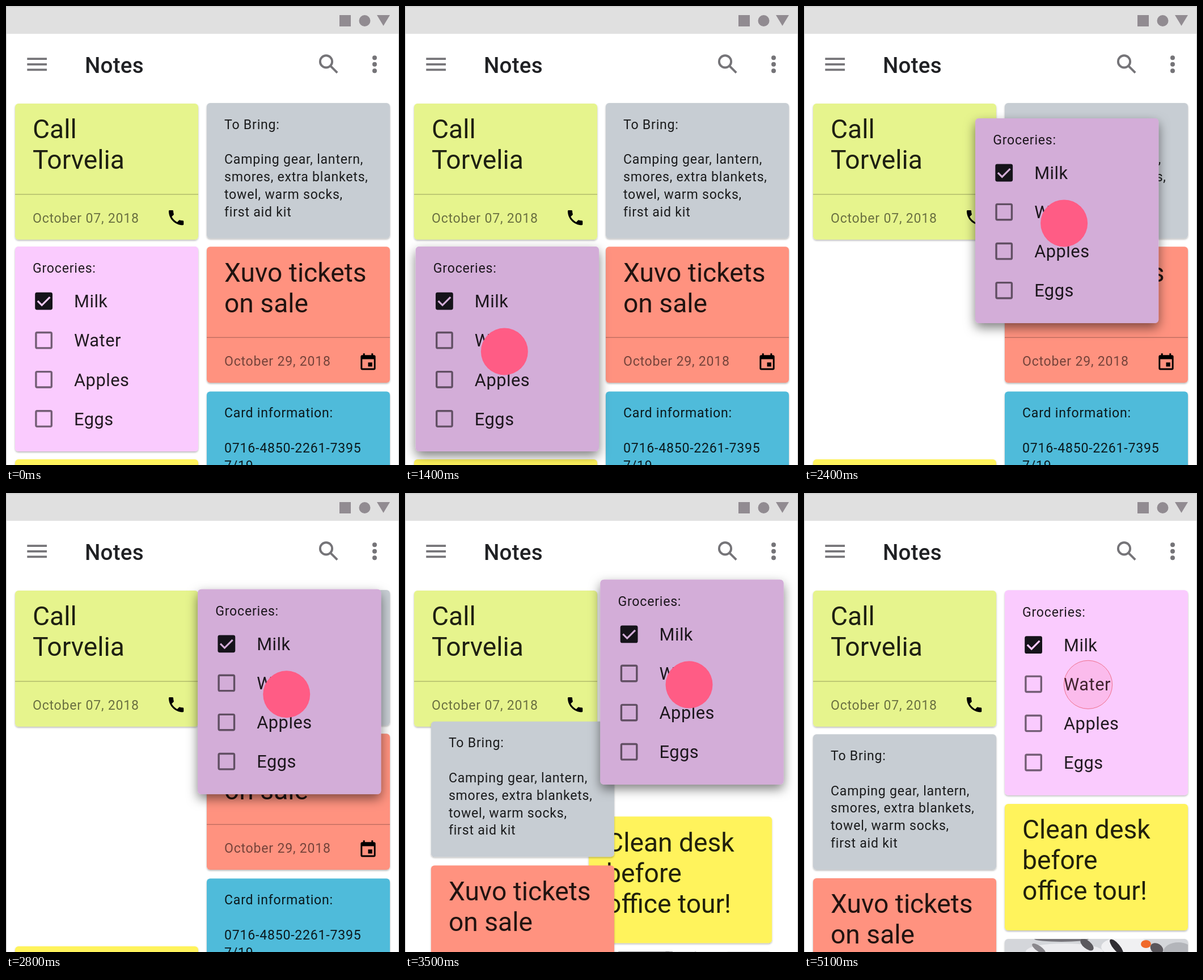
Animation, 693 px wide and 809 px high, one loop 5200 ms. Source, as an HTML page:

```html
<!DOCTYPE html>
<html lang="en">
<head>
<meta charset="utf-8">
<title>Notes</title>
<style>
  html, body { margin: 0; width: 100%; height: 100%; overflow: hidden; background: #fff; }
  svg { display: block; width: 100%; height: 100%; font-family: Roboto, sans-serif; }
  .head { font-size: 46.2px; fill-opacity: .87; }
  .body { font-size: 23.1px; letter-spacing: .77px; fill-opacity: .87; }
  .date { font-size: 23.1px; letter-spacing: .77px; fill-opacity: .54; }
  .item { font-size: 30.8px; letter-spacing: .5px; fill-opacity: .87; }
  .title { font-size: 38.5px; font-weight: 500; letter-spacing: .29px; fill: #202124; }
</style>
</head>
<body>
<svg viewBox="0 0 693 809" preserveAspectRatio="none">
  <defs>
    <filter id="low" x="-10%" y="-10%" width="120%" height="120%">
      <feDropShadow dx="0" dy="1.8" stdDeviation="1.7" flood-opacity=".28"/>
    </filter>
    <filter id="high" x="-20%" y="-20%" width="140%" height="140%">
      <feDropShadow dx="0" dy="8" stdDeviation="9.5" flood-opacity=".5"/>
    </filter>
    <clipPath id="round"><rect width="323" height="240" rx="6"/></clipPath>
  </defs>
  <rect width="693" height="809" fill="#fff"/>
  <g id="cards"></g>
  <circle id="touch" fill="#ff5c85" stroke="#e8404f"/>
  <g id="bar">
    <rect width="693" height="49" fill="#e0e0e0"/>
    <rect width="693" height="2" fill="#d2d2d2"/>
    <g fill="#918b91">
      <rect x="588" y="16" width="20" height="20"/>
      <circle cx="632.5" cy="26" r="10"/>
      <path d="M654 16h23l-11.5 19z"/>
    </g>
    <g fill="#757478">
      <path d="M37.3 91.2H72v3.8H37.3zM37.3 100.9H72v3.8H37.3zM37.3 110.5H72v3.8H37.3z"/>
      <circle cx="650" cy="91.3" r="4"/>
      <circle cx="650" cy="102.8" r="4"/>
      <circle cx="650" cy="114.3" r="4"/>
    </g>
    <g fill="none" stroke="#757478" stroke-width="3.9">
      <circle cx="564.5" cy="97.9" r="10.6"/>
      <path d="M572.4 105.8L584.2 117.6"/>
    </g>
    <text class="title" x="138.9" y="118">Notes</text>
    <path d="M.5 2V809M692.5 2V809" stroke="#c6c6c6"/>
  </g>
</svg>
<script>
const NS = 'http://www.w3.org/2000/svg';
const LOOP = 5200, W = 323, LEFT = 16, RIGHT = 354;
const cards = document.getElementById('cards');
const touch = document.getElementById('touch');

function add(parent, tag, attrs, content) {
  const el = document.createElementNS(NS, tag);
  for (const k in attrs) el.setAttribute(k, attrs[k]);
  if (content) el.textContent = content;
  parent.appendChild(el);
  return el;
}

const lines = (g, cls, x, y, step, list) =>
  list.forEach((s, i) => s && add(g, 'text', { class: cls, x, y: y + i * step }, s));

const panel = (g, height, fill, filter) =>
  add(g, 'rect', { width: W, height, rx: 6, fill, filter: filter ? `url(#${filter})` : 'none' });

function card(h, fill) {
  const g = add(cards, 'g', {});
  panel(g, h, fill, 'low');
  return g;
}

function headline(h, fill, list) {
  const g = card(h, fill);
  lines(g, 'head', 31, 61.4, 54, list);
  return g;
}

function reminder(fill, list, date, icon, x, y) {
  const g = headline(239.7, fill, list);
  add(g, 'path', { d: `M0 160H${W}`, stroke: '#000', 'stroke-opacity': .24, 'stroke-width': 1.6 });
  add(g, 'text', { class: 'date', x: 31, y: 209.5 }, date);
  add(g, 'path', { d: icon, transform: `translate(${x} ${y}) scale(1.46)`, 'fill-rule': 'evenodd' });
  return g;
}

function memo(h, fill, list) {
  const g = card(h, fill);
  lines(g, 'body', 31, 45.7, 30.8, list);
  return g;
}

function photo() {
  const g = card(240, '#d4d6da');
  const p = add(g, 'g', { 'clip-path': 'url(#round)' });
  const blob = (cx, cy, rx, ry, fill, turn = 0) =>
    add(p, 'ellipse', { cx, cy, rx, ry, fill, transform: `rotate(${turn} ${cx} ${cy})` });
  blob(100, 0, 48, 5, '#77757b');
  blob(105, 22, 68, 14, '#ececef');
  blob(60, 17, 14, 5, '#8a888d', 35);
  blob(215, 14, 45, 18, '#f0f0f2');
  blob(145, 10, 14, 7, '#5b595e', 40);
  blob(197, 14, 17, 6, '#2f2d32', 50);
  blob(249, 9, 9, 7, '#f0692a');
  blob(268, 17, 12, 9, '#5a575c', 30);
  blob(306, 22, 26, 16, '#b3b5ba');
  return g;
}

function groceries() {
  const g = add(cards, 'g', {}), h = 361;
  const c = { g, low: panel(g, h, '#facbfe', 'low'), high: panel(g, h, '#d3add8', 'high'), face: panel(g, h) };
  add(g, 'text', { class: 'body', x: 31, y: 46 }, 'Groceries:');
  ['Milk', 'Water', 'Apples', 'Eggs'].forEach((s, i) => {
    const y = 80.7 + i * 69.1;
    add(g, 'text', { class: 'item', x: 104, y: y + 26.6 }, s);
    if (i) {
      add(g, 'rect', { x: 36.9, y: y + 1.7, width: 27.4, height: 27.4, rx: 2,
        fill: 'none', stroke: '#000', 'stroke-opacity': .54, 'stroke-width': 3.4 });
    } else {
      add(g, 'rect', { x: 35.2, y, width: 30.8, height: 30.8, rx: 3.4, fill: '#15131a' });
      c.tick = add(g, 'path', { d: `M39.8 ${y + 15.2}l7.4 7.4L61.4 ${y + 8.4}`,
        fill: 'none', 'stroke-width': 3.2 });
    }
  });
  return c;
}

const PHONE = 'M6.62 10.79c1.44 2.83 3.76 5.14 6.59 6.59l2.2-2.2c.27-.27.67-.36 1.02-.24 1.12.37 2.33.57 3.57.57.55 0 1 .45 1 1V20c0 .55-.45 1-1 1-9.39 0-17-7.61-17-17 0-.55.45-1 1-1h3.5c.55 0 1 .45 1 1 0 1.25.2 2.45.57 3.57.11.35.03.74-.25 1.02z';
const DAY = 'M17 12h-5v5h5zM16 1v2H8V1H6v2H5a2 2 0 0 0-2 2v14a2 2 0 0 0 2 2h14a2 2 0 0 0 2-2V5a2 2 0 0 0-2-2h-1V1zM19 19H5V8h14z';

const call = reminder('#e6f48d', ['Call', 'Torvelia'], 'October 07, 2018', PHONE, 266.6, 183.6);
const picture = photo();
const desk = headline(223, '#fff35b', ['Clean desk', 'before', 'office tour!']);
const bank = memo(200, '#4fbbda', ['Card information:', '', '0716-4850-2261-7395', '7/19']);
const bring = memo(238.5, '#c7cdd3', ['To Bring:', '', 'Camping gear, lantern,',
  'smores, extra blankets,', 'towel, warm socks,', 'first aid kit']);
const tickets = reminder('#ff927f', ['Xuvo tickets', 'on sale'], 'October 29, 2018', DAY, 267, 186.5);
const list = groceries();

const lerp = (a, b, p) => a + (b - a) * p;
const span = (t, a, b) => Math.min(1, Math.max(0, (t - a) / (b - a)));
const mix = (a, b, p) => `rgb(${a.map((v, i) => Math.round(lerp(v, b[i], p)))})`;

// cubic-bezier(.4, 0, .2, 1), solved by bisection
function ease(x) {
  let lo = 0, hi = 1, s = .5;
  for (let i = 0; i < 24; i++) {
    s = (lo + hi) / 2;
    const v = 1.2 * (1 - s) * (1 - s) * s + .6 * (1 - s) * s * s + s * s * s;
    if (v < x) lo = s; else hi = s;
  }
  return s * s * (3 - 2 * s);
}

// smooth monotone curve through [time, value] points
function curve(pts) {
  const slope = i => (pts[i + 1][1] - pts[i][1]) / (pts[i + 1][0] - pts[i][0]);
  const m = pts.map((_, i) => {
    if (!i || i === pts.length - 1) return 0;
    const a = slope(i - 1), b = slope(i);
    return a * b > 0 ? 2 * a * b / (a + b) : 0;
  });
  return t => {
    if (t <= pts[0][0]) return pts[0][1];
    for (let i = 0; i < pts.length - 1; i++) {
      const [t0, v0] = pts[i], [t1, v1] = pts[i + 1];
      if (t > t1) continue;
      const d = t1 - t0, u = (t - t0) / d, w = 1 - u;
      return v0 * (1 + 2 * u) * w * w + v1 * u * u * (3 - 2 * u)
        + d * u * w * (m[i] * w - m[i + 1] * u);
    }
    return pts[pts.length - 1][1];
  };
}

const dragX = curve([[1250, LEFT], [1400, 18.8], [2000, 219], [2400, 302], [2800, 338.2], [3300, 344.5]]);
const dragY = curve([[1400, 424], [1800, 378], [2000, 336], [2400, 198], [2800, 169.8], [3400, 152.8]]);

const place = (g, x, y) => g.setAttribute('transform', `translate(${x.toFixed(2)} ${y.toFixed(2)})`);

function draw(t) {
  const flow = ease(span(t, 2850, 3850));
  const toLeft = lerp(RIGHT, LEFT, flow), toRight = lerp(LEFT, RIGHT, flow);
  place(call, LEFT, 172);
  place(bring, toLeft, lerp(171, 425.3, flow));
  place(tickets, toLeft, lerp(424.3, 679, flow));
  place(bank, toLeft, lerp(679.5, 934, flow));
  place(desk, toRight, lerp(799, 548, flow));
  place(picture, toRight, lerp(1037, 786, flow));

  const drop = ease(span(t, 4640, 5090));
  const lift = ease(span(t, 700, 1150)) * (1 - drop);
  const x = dragX(t), y = dragY(t);
  place(list.g, lerp(x, RIGHT, drop), lerp(y, 171.6, drop));
  const face = mix([250, 203, 254], [211, 173, 216], lift);
  list.face.setAttribute('fill', face);
  list.tick.setAttribute('stroke', face);
  list.low.setAttribute('opacity', 1 - lift);
  list.high.setAttribute('opacity', lift);

  const shown = span(t, 350, 650) * (1 - span(t, 4700, 5170));
  const rim = shown < 1 ? Math.min(1, shown * 6) * (1 - shown) : 0;
  touch.setAttribute('cx', x + 156.5);
  touch.setAttribute('cy', y + 185);
  touch.setAttribute('r', lerp(42.8, 41.5, shown));
  touch.setAttribute('fill-opacity', shown);
  touch.setAttribute('stroke-opacity', rim * .85);
}

const start = performance.now();
function tick() {
  draw((performance.now() - start) % LOOP);
  requestAnimationFrame(tick);
}
tick();
</script>
</body>
</html>
```
